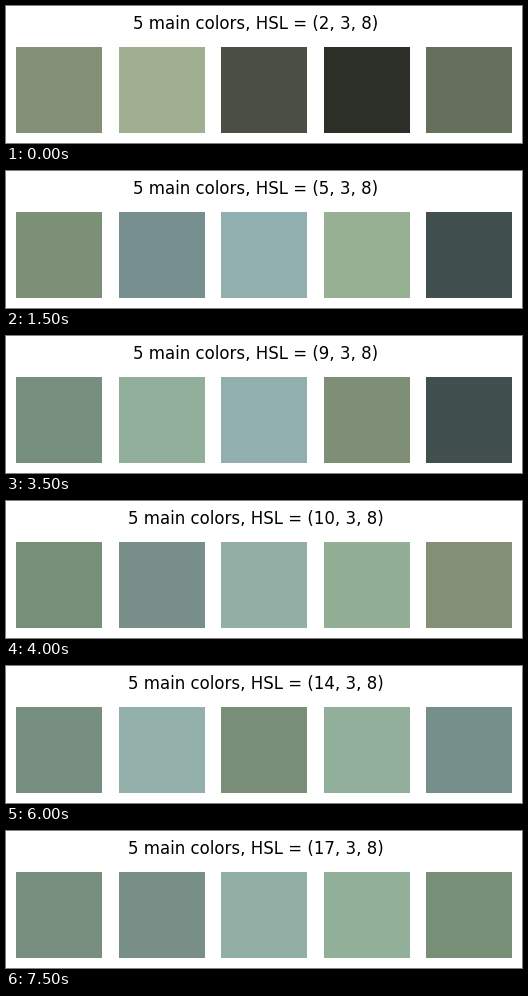
These frames come from a looping animation (516 by 137 pixels, 8 s). A matplotlib script:

```python
import colorsys

import matplotlib.pyplot as plt
from matplotlib.animation import FuncAnimation
from matplotlib.patches import Rectangle

W, H, DPI = 516, 137, 100
SIDE, STEP, PAD = 86, 102.62, 10
S_BINS, V_BINS, FIRST = 3, 8, 2

# Ranked colors for each hue bin count: hue family + brightness bin.
# Families step down from the last bin that is centred at or below 180 degrees.
FAMILIES = "tgoy"
RANKS = [
    "t4 t5 t2 t1 t3",
    "t4 t5 g4 t2 t1",
    "t4 t5 t2 g4 t1",
    "g4 t4 t5 g5 t2",
    "t4 t5 g4 t2 g5",
    "g4 g5 t5 o4 t4",
    "g4 g5 t4 t5 t2",
    "g4 g5 t5 o4 t2",
    "g4 t4 t5 g5 o4",
    "g4 o5 o4 g5 t5",
    "g4 t5 t4 g5 t2",
    "o4 g4 o5 g5 t5",
    "g4 t5 o4 g5 t4",
    "o4 g4 o5 g5 y4",
    "o4 g4 t5 t4 o5",
    "o4 g4 g5 o5 y4",
]


def bin_color(token, hue_bins):
    """Color at the centre of an HSV bin."""
    family, level = token
    hue_bin = (hue_bins - 1) // 2 - FAMILIES.index(family)
    rgb = colorsys.hsv_to_rgb((hue_bin + 0.5) / hue_bins,
                              0.5 / S_BINS,
                              (int(level) + 0.5) / V_BINS)
    return tuple(int(c * 255) / 255 for c in rgb)


fig = plt.figure(figsize=(W / DPI, H / DPI), dpi=DPI, facecolor="white")
ax = fig.add_axes([0, 0, 1, 1])
ax.set(xlim=(0, W), ylim=(0, H))
ax.axis("off")

title = ax.text(250, 114, "", ha="center", va="baseline", color="black",
                family="DejaVu Sans", fontsize=12)
swatches = [
    ax.add_patch(Rectangle((round(PAD + k * STEP), PAD), SIDE, SIDE,
                           linewidth=0, antialiased=False))
    for k in range(5)
]


def update(i):
    hue_bins = FIRST + i
    title.set_text(f"5 main colors, HSL = ({hue_bins}, {S_BINS}, {V_BINS})")
    for swatch, token in zip(swatches, RANKS[i].split()):
        swatch.set_facecolor(bin_color(token, hue_bins))
    return [title, *swatches]


anim = FuncAnimation(fig, update, frames=len(RANKS), interval=500,
                     repeat=True, repeat_delay=0, blit=False)
plt.show()
```
